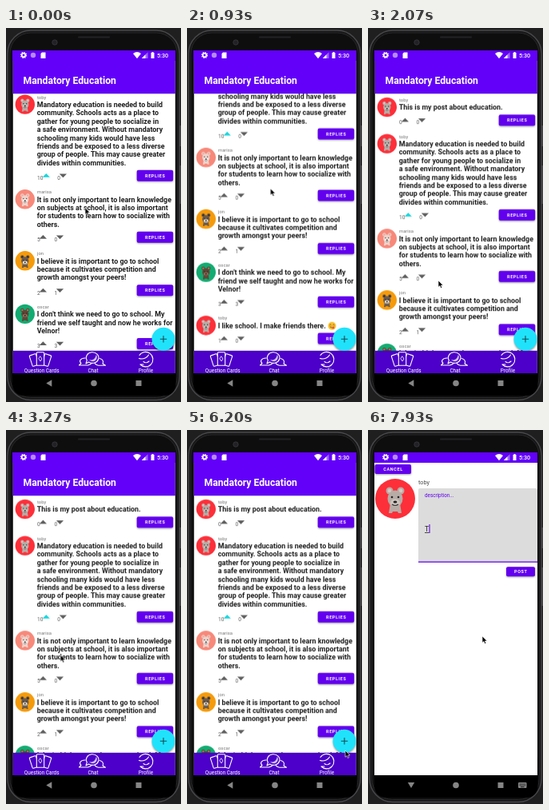
An HTML page for the animation above (8 s loop, 219 px wide and 468 px high).

```html
<!DOCTYPE html>
<html lang="en">
<head>
<meta charset="utf-8">
<title>Discussion board</title>
<style>
html, body { margin: 0; width: 100%; height: 100%; overflow: hidden; background: #1f1f20; }
svg { display: block; width: 100vw; height: 100vh; font-family: Roboto, "Open Sans", sans-serif; }
.post { font-weight: 700; font-size: 8.9px; fill: #1e1e1e; }
.user { font-size: 5.9px; fill: #747474; }
.count { font-size: 6.6px; fill: #5c5c5c; }
.btn { font-weight: 700; font-size: 5.5px; letter-spacing: .58px; fill: #fff; text-anchor: middle; }
.tab { font-size: 6.4px; fill: #fff; text-anchor: middle; }

#list, #cursor, #form, .typing, .browsing, #label, #typed, #caret { animation: 8s linear infinite; }
#list { animation-name: scroll; }
#cursor { animation-name: point; }
#form { animation-name: open; }
.typing { animation-name: show; }
.browsing { animation-name: hide; }
#label { animation-name: float; }
#typed { animation-name: type; animation-timing-function: step-end; }
#caret { animation-name: caret; animation-timing-function: step-end; }

@keyframes scroll {
  0% { transform: translateY(-49px); }
  5.875% { transform: translateY(-111.4px); animation-timing-function: ease-out; }
  9.5% { transform: translateY(-113px); animation-timing-function: ease-in; }
  16.625% { transform: translateY(-23.4px); animation-timing-function: ease-out; }
  21%, 100% { transform: translateY(0); }
}
@keyframes point {
  0% { transform: translate(99px, 225px); }
  5.875% { transform: translate(103px, 190px); animation-timing-function: ease-out; }
  9.5% { transform: translate(104px, 187px); animation-timing-function: ease-in; }
  16.625% { transform: translate(107px, 294px); animation-timing-function: ease-out; }
  21.5% { transform: translate(104px, 318px); }
  25.875% { transform: translate(88px, 316px); }
  33% { transform: translate(76px, 300px); animation-timing-function: ease-in-out; }
  54.5%, 62.5% { transform: translate(48px, 234px); animation-timing-function: ease-in-out; }
  72.5%, 80% { transform: translate(198px, 401px); animation-timing-function: ease-in-out; }
  95.8%, 100% { transform: translate(143px, 258px); }
}
@keyframes open {
  0%, 80% { transform: translateY(30px); opacity: 0; animation-timing-function: ease-out; }
  82.6%, 100% { transform: none; opacity: 1; }
}
@keyframes show {
  0%, 83.4% { opacity: 0; }
  83.5%, 100% { opacity: 1; }
}
@keyframes hide {
  0%, 83.4% { opacity: 1; }
  83.5%, 100% { opacity: 0; }
}
@keyframes float {
  0%, 83.2% { transform: translate(71px, 127px) scale(1.3); fill: #6f6f6f; }
  85%, 100% { transform: translate(71px, 83.6px); fill: #6200ee; }
}
@keyframes type {
  0% { opacity: 0; }
  97.8%, 100% { opacity: 1; }
}
@keyframes caret {
  0% { opacity: 0; transform: translateX(-6px); }
  84% { opacity: 1; transform: translateX(-6px); }
  90% { opacity: 0; transform: translateX(-6px); }
  96.2% { opacity: 1; transform: translateX(-6px); }
  97.8%, 100% { opacity: 1; transform: none; }
}
</style>
</head>
<body>
<svg viewBox="0 0 219 468" preserveAspectRatio="none">
  <defs>
    <clipPath id="screen"><rect x="8.8" y="28" width="203" height="404"/></clipPath>
    <clipPath id="feed"><rect x="8" y="82" width="204" height="322"/></clipPath>
    <filter id="soft" x="-30%" y="-30%" width="160%" height="170%"><feGaussianBlur stdDeviation="1.2"/></filter>
  </defs>

  <!-- phone -->
  <rect x="2" y="3" width="215" height="462.5" rx="29" fill="#161617" stroke="#48484b" stroke-width="1.4"/>
  <rect x="4.8" y="6" width="209.400" height="456.500" rx="26" fill="#0e0e0f" stroke="#29292b"/>
  <rect x="8" y="400" width="204.500" height="60" rx="14" fill="#000"/>
  <rect x="90" y="10.500" width="40" height="2" rx="1" fill="#232326"/>
  <circle cx="61" cy="18" r="3.200" fill="#222226" stroke="#3a3a3e" stroke-width=".8"/>
  <path d="M218 122v26M218 172v48" stroke="#505054" stroke-width="1.400"/>

  <g clip-path="url(#screen)">
    <rect x="8" y="27" width="204" height="406" fill="#fff"/>
    <g clip-path="url(#feed)"><g id="list"></g></g>
    <path d="M8 82.500h204M8 403.500h204" stroke="#000" opacity=".16"/>
    <rect x="8" y="27" width="204" height="55" fill="#6200fa"/>
    <text x="21.500" y="69.800" font-size="12.200" font-weight="700" fill="#fff">Mandatory Education</text>

    <circle cx="197" cy="391" r="14.300" fill="#000" opacity=".4" filter="url(#soft)"/>
    <circle cx="197" cy="389.300" r="14.500" fill="#20e3fb"/>
    <path d="M192.800 389.300h8.400M197 385.100v8.400" stroke="#174b55" stroke-width="1.100"/>

    <!-- tabs -->
    <rect x="8" y="404" width="204" height="29" fill="#4c00c9"/>
    <g fill="#4c00c9" stroke="#fff" stroke-width="1.100" stroke-linejoin="round" stroke-linecap="round">
      <rect x="-4.300" y="-7.500" width="8.600" height="14" rx="1" transform="translate(35.500 416) rotate(-18)"/>
      <rect x="-4.300" y="-7.500" width="8.600" height="14" rx="1" transform="translate(50.500 416) rotate(18)"/>
      <rect x="38.300" y="405.800" width="9.400" height="16.500" rx="1"/>
      <path d="M43 411l2 3-2 3-2-3z" fill="none" stroke-width=".8"/>
      <g fill="none">
        <path d="M99 413c-6 0-8 4-5 6.500l-2.500 2.500h11q4-1 5-3"/>
        <path d="M117 413.500c4 .5 5.500 4 4 6.500l3.500 2.200h-9q-3-.5-4.500-2.500"/>
      </g>
      <path d="M103.500 418l-3.500 2 1.300-4.200a7.800 6.800 0 1 1 2.200 2.200z"/>
      <path d="M104 415q7 2 9-6.500 2 4.500-1 7.500-4 3-8-1z" fill="#cfc0f3" stroke="none"/>
      <g fill="none">
        <path d="M167 409.500a9.200 9.200 0 1 1 1 11.500h4"/>
        <path d="M166.500 413.500c5 1.500 10-.5 12-4.500M172 417.500c2 1.800 5 1.600 7-.5"/>
      </g>
    </g>
    <text class="tab" x="44.700" y="430.600">Question Cards</text>
    <text class="tab" x="109" y="430.600">Chat</text>
    <text class="tab" x="175" y="430.600">Profile</text>

    <!-- new post form -->
    <g id="form">
      <rect x="8" y="41" width="204" height="392" fill="#fff"/>
      <g id="formParts"></g>
      <text x="63" y="68.300" font-size="7.300" fill="#4a4a4a">toby</text>
      <path d="M63 165.500V75q0-2 2-2h145q2 0 2 2v90.500z" fill="#dcdcdc"/>
      <path d="M63 165.200h149" stroke="#6200ee" stroke-width="1.200"/>
      <text id="label" font-size="6.300">description...</text>
      <g id="typed">
        <text x="71" y="127" font-size="8.900" fill="#222">T</text>
        <path d="M71 128.500h5.500" stroke="#222" stroke-width=".8"/>
      </g>
      <path id="caret" d="M77 118v11" stroke="#6200ee" stroke-width="1.100"/>
    </g>

    <!-- status bar -->
    <rect x="8" y="27" width="204" height="14" fill="#6200fa"/>
    <g fill="#fff">
      <circle cx="22" cy="34" r="2.300" fill="none" stroke="#fff" stroke-width="1.700"/>
      <circle cx="22" cy="34" r="3.600" fill="none" stroke="#fff" stroke-width="1.100" stroke-dasharray="1.400 1.427"/>
      <circle cx="34" cy="34" r="3.200" fill="#b58cf2"/>
      <path d="M45 30.500h4.500v7.500h-6v-6z"/>
      <path d="M159 32q5-4 10 0l-5 6.200z"/>
      <path d="M177.500 30.300v7.700h-7.700z" opacity=".4"/>
      <path d="M174.500 33.300v4.700h-4.700z"/>
      <path d="M181.500 31h1v-1h2v1h1v7h-4z"/>
      <text x="189" y="37" font-size="7.200" font-weight="500">5:30</text>
    </g>
  </g>

  <!-- system keys -->
  <g fill="#858585">
    <path class="browsing" d="M57.300 440.300v8.400l-7-4.200z"/>
    <circle cx="110" cy="444.500" r="3.800"/>
    <rect x="162.500" y="441" width="7" height="7"/>
    <g class="typing">
      <path d="M49.800 441h8.400l-4.200 7z"/>
      <rect x="188" y="441" width="10.500" height="7" rx="1"/>
      <path d="M189.500 443h7.500M189.500 444.800h7.500" stroke="#000" stroke-width=".9" stroke-dasharray="1 .6"/>
      <path d="M191 446.700h4.500" stroke="#000" stroke-width=".8"/>
    </g>
  </g>

  <path id="cursor" d="M0 0v8.300l1.900-1.700 1.300 2.900 1.500-.7-1.300-2.800h2.600z" fill="#000" stroke="#fff" stroke-width=".6"/>
</svg>

<script>
const animals = {
  mouse: { bg: '#fd2f39', fur: '#b7aca6', inner: '#d8c6c0', muzzle: '#cfc5bf' },
  cat: { bg: '#f7897a', fur: '#eed3cb', inner: '#e9a79d', muzzle: '#fff0ec' },
  dog: { bg: '#f59b0b', fur: '#6a5a4c', inner: '#2f2a26', muzzle: '#f3e8d6' },
  bear: { bg: '#12ac72', fur: '#5f4636', inner: '#a87c5d', muzzle: '#94705a' }
};

const posts = [
  { user: 'toby', pet: 'mouse', up: 0, down: 0, lines: ['This is my post about education.'] },
  { user: 'toby', pet: 'mouse', up: 10, down: 0, voted: true, lines: [
    'Mandatory education is needed to build',
    'community. Schools acts as a place to',
    'gather for young people to socialize in',
    'a safe environment. Without mandatory',
    'schooling many kids would have less',
    'friends and be exposed to a less diverse',
    'group of people. This may cause greater',
    'divides within communities.'] },
  { user: 'marisa', pet: 'cat', up: 5, down: 0, lines: [
    'It is not only important to learn knowledge',
    'on subjects at school, it is also important',
    'for students to learn how to socialize with',
    'others.'] },
  { user: 'jon', pet: 'dog', up: 2, down: 1, lines: [
    'I believe it is important to go to school',
    'because it cultivates competition and',
    'growth amongst your peers!'] },
  { user: 'oscar', pet: 'bear', up: 3, down: 3, lines: [
    "I don't think we need to go to school. My",
    'friend we self taught and now he works for',
    'Velnor!'] },
  { user: 'toby', pet: 'mouse', up: 1, down: 0, emoji: true, lines: ['I like school. I make friends there.'] },
  { user: 'toby', pet: 'mouse', up: 0, down: 0, lines: [''] }
];

const text = (cls, x, y, s) => `<text class="${cls}" x="${x}" y="${y}">${s}</text>`;

// Drawn in a circle of radius 25, then scaled
function avatar(x, y, r, kind) {
  const { bg, fur, inner, muzzle } = animals[kind];
  const ear = s => `<circle cx="${s * 7}" cy="-10" r="4.5" fill="${fur}"/><circle cx="${s * 7}" cy="-10" r="2.4" fill="${inner}"/>`;
  return `<g transform="translate(${x} ${y}) scale(${r / 25})">
    <circle r="25" fill="${bg}"/>${ear(-1)}${ear(1)}
    <path d="M-6 6h12l2 12h-4l-1-2h-6l-1 2h-4z" fill="${fur}"/>
    <ellipse cy="0" rx="9.5" ry="10.5" fill="${fur}"/>
    <ellipse cy="5" rx="6" ry="4.6" fill="${muzzle}"/>
    <circle cx="-4" cy="-2" r="1.3" fill="#222"/><circle cx="4" cy="-2" r="1.3" fill="#222"/>
    <ellipse cy="4" rx="2.4" ry="1.6" fill="#222"/>
    <path d="M-4 7q4 3 8 0" fill="none" stroke="#333" stroke-width="1.2"/></g>`;
}

function button(x, y, w, h, label) {
  const box = dy => `x="${x}" y="${y + dy}" width="${w}" height="${h}" rx="2"`;
  return `<rect ${box(1)} fill="#000" opacity=".35" filter="url(#soft)"/>
    <rect ${box(0)} fill="#6200ee"/>` + text('btn', x + w / 2 + .3, y + h / 2 + 2, label);
}

function emoji(x, y) {
  return `<circle cx="${x}" cy="${y}" r="5" fill="#fbc02d"/>
    <path d="M${x - 3} ${y - 1}q1-1.500 2 0M${x + 1} ${y - 1}q1-1.500 2 0M${x - 2.7} ${y + 1}q2.700 2.500 5.400 0" fill="none" stroke="#5d3b10" stroke-width=".8"/>
    <circle cx="${x + 1.6}" cy="${y + 2.6}" r="1.3" fill="#ef4b4b"/>`;
}

function votes(p, y) {
  const shift = String(p.up).length > 1 ? 3.9 : 0;
  const upX = 46.4 + shift, downX = 67.5 + shift;
  return text('count', 39, y + 3, p.up) + text('count', 60.4 + shift, y + 3, p.down) +
    `<path d="M${upX - 4.6} ${y - .2}h9.200l-4.600-4.800z" fill="${p.voted ? '#18d6dc' : '#5e5e5e'}"/>
     <path d="M${downX - 4.6} ${y - 4.5}h9.200l-4.600 4.800z" fill="#5e5e5e"/>`;
}

let top0 = 90, feed = '';
for (const p of posts) {
  const first = top0 + 9.3;
  const last = first + 10.4 * (p.lines.length - 1);
  feed += avatar(23.8, top0 + 9, 12.2, p.pet) + text('user', 39, top0 + 2, p.user);
  p.lines.forEach((s, i) => feed += text('post', 38.7, first + 10.4 * i + 3.1, s));
  if (p.emoji) feed += emoji(181.5, first + .2);
  feed += votes(p, last + 18.3) + button(163.7, last + 9, 45.5, 14, 'REPLIES');
  top0 = last + 36.5;
}
document.getElementById('list').innerHTML = feed;
document.getElementById('formParts').innerHTML =
  button(8.5, 43, 45.5, 12, 'CANCEL') + avatar(34, 86, 25, 'mouse') + button(173, 171.3, 36, 12, 'POST');
</script>
</body>
</html>
```
